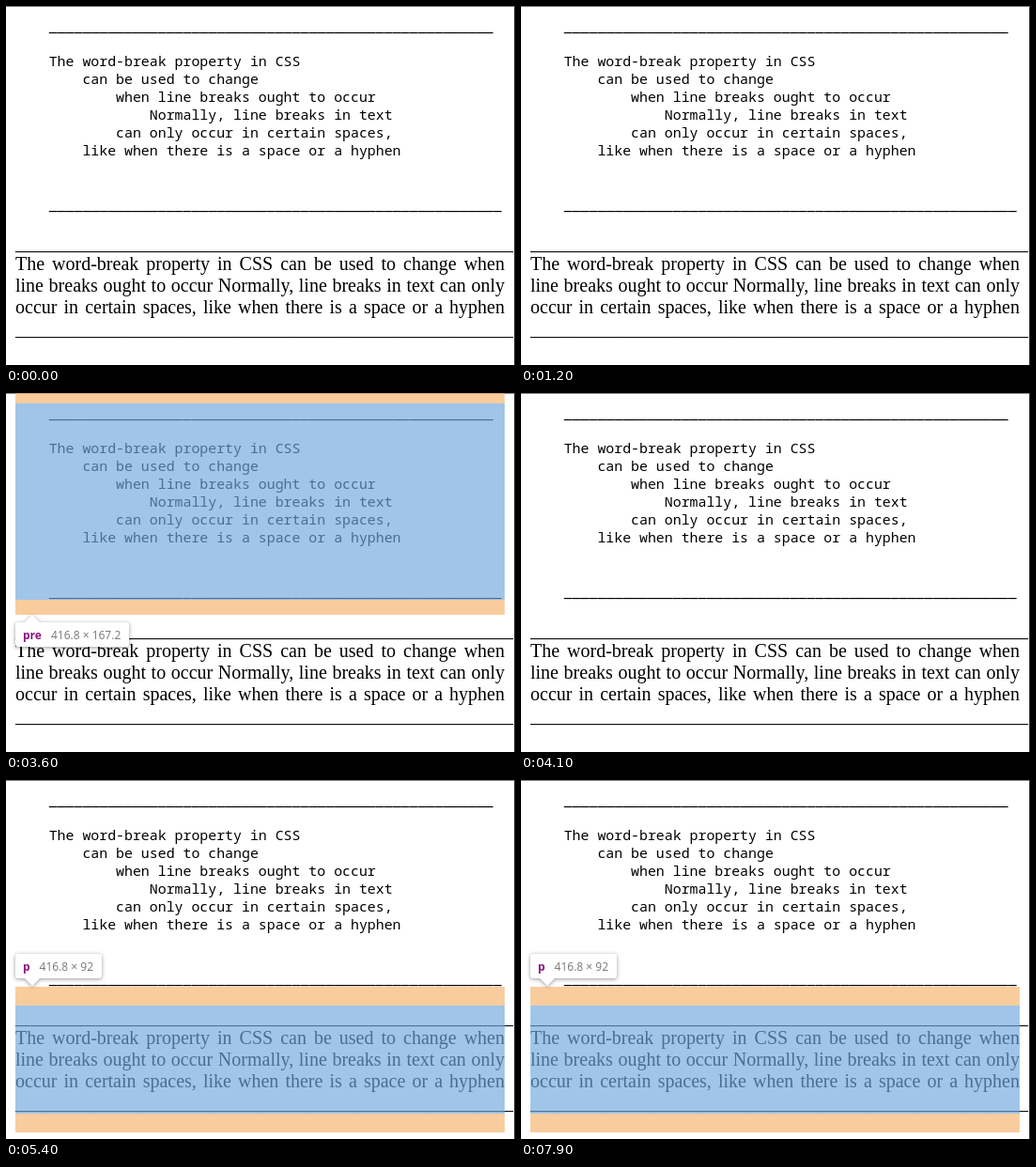
Animation, 542 px wide and 382 px high, one loop 8000 ms. Source, as an HTML page:

```html
<!DOCTYPE html>
<html lang="en">
<head>
<meta charset="utf-8">
<title>word-break</title>
<style>
  html, body { margin: 0; width: 100%; height: 100%; overflow: hidden; background: #fff; }
  .stage { position: relative; width: 542px; height: 382px; overflow: hidden; color: #000; }
  .stage > * { position: absolute; margin: 0; }
  .frame { inset: 0; box-sizing: border-box; border: solid #444; border-width: 1px 1px 0 0; border-top-color: #808080; }
  pre { left: 10px; top: 10.75px; width: 521px; font: 14.89px/19px "Noto Sans Mono", monospace; }
  .para { left: 10px; top: 239.75px; width: 521px; font: 20px/23px "Liberation Serif", "Times New Roman", serif; text-align: justify; }
  .rule { position: relative; top: 1px; }

  /* inspector highlight: content box with its margins */
  .hit { left: 0; top: 0; width: 100%; height: 100%; visibility: hidden; }
  .hit > * { position: absolute; }
  .box { left: 10px; width: 521px; box-sizing: border-box; background: rgba(111, 168, 220, .66); background-clip: padding-box;
         border: solid rgba(246, 178, 107, .66); border-width: 0; }
  .hit-pre .box { top: 0; height: 235.75px; border-top-width: 11px; border-bottom-width: 16px; }
  .hit-p .box { top: 220px; height: 154.5px; border-top-width: 20px; border-bottom-width: 20px; }

  .tip { left: 10px; height: 26px; padding: 0 8px; box-sizing: border-box; border-radius: 3px; background: #fff;
         font: 12px/27px "Open Sans", "Noto Sans", sans-serif; color: #777; white-space: nowrap;
         filter: drop-shadow(0 1px 2px rgba(0, 0, 0, .4)); }
  .tip b { color: #881280; margin-right: 10px; }
  .tip::after { content: ""; position: absolute; left: 10px; border: solid transparent; border-width: 0 8px; }
  .hit-pre .tip { top: 244px; width: 121px; }
  .hit-pre .tip::after { bottom: 100%; border-bottom: 8px solid #fff; }
  .hit-p .tip { top: 185px; width: 92px; }
  .hit-p .tip::after { top: 100%; border-top: 8px solid #fff; }

  .hit-p { animation: hover-p 8s step-end infinite; }
  .hit-pre { animation: hover-pre 8s step-end infinite; }
  @keyframes hover-p {
    0%, 10% { visibility: hidden; }
    3.75%, 62.5%, 100% { visibility: visible; }
  }
  @keyframes hover-pre {
    0%, 50%, 100% { visibility: hidden; }
    18.75% { visibility: visible; }
  }
</style>
</head>
<body>
<div class="stage">
  <div class="frame"></div>
  <pre>    <span class="rule">_____________________________________________________</span>

    The word-break property in CSS
        can be used to change
            when line breaks ought to occur
                Normally, line breaks in text
            can only occur in certain spaces,
        like when there is a space or a hyphen


    <span class="rule">______________________________________________________</span></pre>
  <p class="para">
    <span class="rule">_____________________________________________________</span>
    The word-break property in CSS can be used to change when
    line breaks ought to occur Normally, line breaks in text can only
    occur in certain spaces, like when there is a space or a hyphen
    _____________________________________________________
  </p>
  <div class="hit hit-pre">
    <div class="box"></div>
    <div class="tip"><b>pre</b>416.8 × 167.2</div>
  </div>
  <div class="hit hit-p">
    <div class="box"></div>
    <div class="tip"><b>p</b>416.8 × 92</div>
  </div>
</div>
</body>
</html>
```
